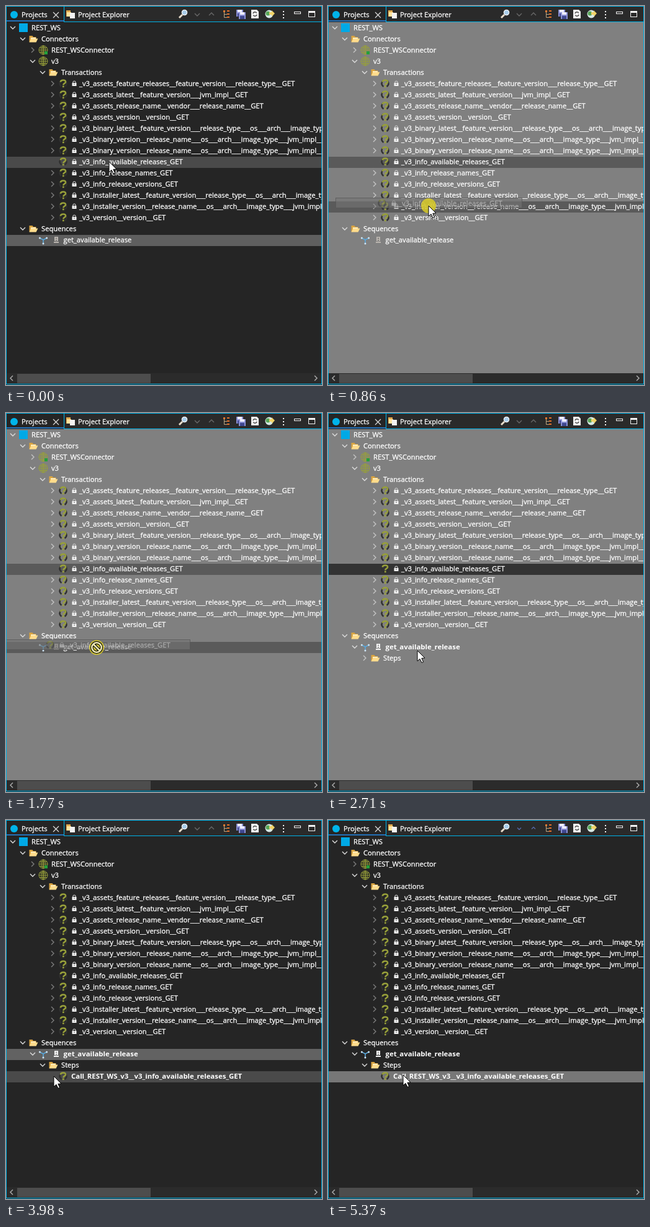
Recreate the animation shown at these times as an HTML page with a canvas. Size 509 by 611 pixels, loop 6870 ms.

```html
<!DOCTYPE html>
<html lang="en">
<head>
<meta charset="utf-8">
<title>Projects tree</title>
<style>
html, body { margin: 0; width: 100%; height: 100%; overflow: hidden; background: #252525; }
canvas { display: block; }
</style>
</head>
<body>
<canvas id="stage" width="509" height="611"></canvas>
<script>
const W = 509, H = 611, LOOP = 6870, STEP = 70;
const BAR = 26, ROW = 18, INDENT = 16, FOOT = 592;
const CYAN = '#00b4ea', OLIVE = '#98a03a', PALE = '#f2f2f2';
const g = document.getElementById('stage').getContext('2d');

// Moments at which the state changes
const PRESS = 270, DRAG = 400, DENY = 1630, DROP = 2040, FADE = 2370, GONE = 2430,
  ADDED = 2630, SETTLED = 2760, UNFOLD = 3780, UNFOLDED = 3850, SELECT = 4780;

// Each move eases the pointer from where it was; the power shapes the vertical slowdown.
const HOME = { x: 166, y: 251 };
const MOVES = [
  { from: 200, to: 510, x: 168, y: 264, power: 1 },
  { from: 510, to: 1770, x: 146, y: 378, power: 2.2 },
  { from: 1770, to: 1900, x: 144, y: 383, power: 1 },
  { from: 2890, to: 3170, x: 75, y: 398, power: 1 },
  { from: 3240, to: 3640, x: 58, y: 393, power: 1 },
  { from: 3850, to: 3980, x: 77, y: 413, power: 1 },
  { from: 3980, to: 4050, x: 78, y: 419, power: 1 },
  { from: 4120, to: 4570, x: 118, y: 410, power: 1 },
  { from: 5300, to: 5370, x: 121, y: 411, power: 1 }
];

const CALLS = [
  'assets_feature_releases__feature_version___release_type__GET',
  'assets_latest__feature_version___jvm_impl__GET',
  'assets_release_name__vendor___release_name__GET',
  'assets_version__version__GET',
  'binary_latest__feature_version___release_type___os___arch___image_type___jvm_impl__GET',
  'binary_version__release_name___os___arch___image_type___jvm_impl__GET',
  'binary_version__release_name___os___arch___image_type___jvm_impl__project__GET',
  'info_available_releases_GET',
  'info_release_names_GET',
  'info_release_versions_GET',
  'installer_latest__feature_version___release_type___os___arch___image_type___jvm_impl__GET',
  'installer_version__release_name___os___arch___image_type___jvm_impl__GET',
  'version__version__GET'
];
const PICKED = '_v3_info_available_releases_GET';
const SEQUENCE = 'get_available_release';
const STEP_CALL = 'Call_REST_WS_v3_' + PICKED;

const rowTop = i => BAR + 1 + ROW * i;
const rowAt = y => Math.floor((y - BAR - 1) / ROW);

function rect(color, x, y, w, h) {
  g.fillStyle = color;
  g.fillRect(x, y, w, h);
}
function box(color, x, y, w, h) {
  g.strokeStyle = color;
  g.lineWidth = 1;
  g.strokeRect(x + .5, y + .5, w - 1, h - 1);
}
function fill(color, d) {
  g.fillStyle = color;
  g.fill(new Path2D(d));
}
function stroke(color, width, d) {
  g.strokeStyle = color;
  g.lineWidth = width;
  g.stroke(new Path2D(d));
}
function disc(color, x, y, r) {
  g.beginPath();
  g.arc(x, y, r, 0, 7);
  g.fillStyle = color;
  g.fill();
}
function ring(color, width, x, y, rx, ry = rx, from = 0, to = Math.PI * 2) {
  g.beginPath();
  g.ellipse(x, y, rx, ry, 0, from, to);
  g.strokeStyle = color;
  g.lineWidth = width;
  g.stroke();
}
function text(s, x, y, bold, color = '#fff') {
  g.font = (bold ? 'bold 11.4px' : '11.2px') + ' "Open Sans", "Noto Sans", sans-serif';
  g.fillStyle = g.strokeStyle = color;
  g.fillText(s, x, y + 4);
  if (bold) return;
  g.lineWidth = .3;
  g.strokeText(s, x, y + 4);
}
function at(x, y, draw) {
  g.save();
  g.translate(x, y);
  draw();
  g.restore();
}
function chevron(x, y, turn, color, size = 4) {
  at(x, y, () => {
    g.rotate(turn);
    stroke(color, 1.4, `M${-size} ${-size / 2}L0 ${size / 2}L${size} ${-size / 2}`);
  });
}

const icons = {
  project() { rect('#00a9e6', -7, -7, 14, 14); },
  folder() {
    fill('#d9a441', 'M-6.5 5V-5H-1.5L0 -3H4.5V5Z');
    rect('#fff3cf', -4, -2, 8, 3);
    fill('#ffdc8c', 'M-6.5 5.5L-3.5 -.5H7.5L4.5 5.5Z');
  },
  globe() {
    for (const rx of [7, 3.2, 0]) ring(OLIVE, 1, 0, 0, rx, 7);
    for (const y of [-3.5, 0, 3.5]) {
      const half = Math.sqrt(49 - y * y);
      rect(OLIVE, -half, y - .5, half * 2, 1);
    }
  },
  connector() {
    icons.globe();
    rect('#24a03a', 2, 2, 5, 5);
  },
  call() {
    for (const side of [0, Math.PI]) ring('#303030', 2.5, 0, 0, 5.5, 5.5, side - 1.1, side + 1.1);
    stroke(OLIVE, 2.6, 'M-4.3 -2.5C-3.5 -6.5 4.6 -6.5 4 -2.3C3.6 -.3 .4 -.5 .3 2.4');
    rect(OLIVE, -1, 3.6, 2.6, 2.6);
  },
  sequence() {
    for (let i = 0; i < 3; i++) {
      const a = Math.PI * (1 / 2 + i * 2 / 3), x = 6.5 * Math.cos(a), y = 6 * Math.sin(a);
      stroke('#5aa9dd', 1.5, `M0 0L${x} ${y}`);
      disc('#cfe6f6', x, y, 1.5);
    }
  }
};

function lock(x, y) {
  ring('#c8c8c8', 1.2, x, y - 1, 2.2, 3, Math.PI, 0);
  rect(PALE, x - 3.5, y - 1, 7, 5);
  rect('#555', x - .5, y, 1, 2);
}
function badge(x, y, color) {
  rect(color, x - 3, y - 5, 6, 7);
  for (const dy of [-3, 0]) rect('#555', x - 1, y + dy, 2, 1);
  rect(color, x - 4, y + 3, 8, 2);
}

const tools = {
  find() {
    stroke('#e8dccb', 3, 'M-1 1L-6 6');
    disc('#a9cdea', 2.5, -2.5, 4);
    ring(PALE, 1.2, 2.5, -2.5, 4.2);
  },
  tree() {
    stroke('#bda680', 1, 'M-3.5 -5V5.5H2M-3.5 .5H2');
    rect('#e27a32', -5, -6, 3, 3);
    for (const y of [-5, 0, 5]) rect('#e0702c', 1, y - 1, 4, 2);
  },
  save() {
    for (const d of [-7, -3]) {
      rect('#8c91d4', d, d, 11, 11);
      rect('#eef', d + 2, d, 7, 4);
      rect('#3f478f', d + 2, d + 6, 7, 5);
    }
  },
  refresh() {
    fill(PALE, 'M-6 -7H3L6 -4V7H-6Z');
    for (const side of [0, Math.PI]) ring('#444', 1.4, 0, 0, 3.2, 3.2, side + .3, side + 2.6);
  },
  world() {
    disc('#d7e8e6', 0, 0, 6.5);
    disc('#57a557', -2, -1, 3.5);
    fill('#f1d368', 'M0 -3H4V-6L9 -1L4 4V1H0Z');
  },
  more() { for (const y of [-5, 0, 5]) rect(PALE, -1, y, 2, 2); },
  shrink() { box(PALE, -6, -4, 11, 4); },
  grow() {
    box(PALE, -6, -5, 11, 10);
    rect(PALE, -6, -4, 11, 2);
  }
};

function header(enabled) {
  rect('#2a2a2a', 0, 0, W, BAR);
  rect('#252525', 1, 1, 92, BAR - 1);
  rect('#2470b8', 1, BAR - 3, 92, 2);
  disc(CYAN, 13, 14, 6);
  text('Projects', 25, 14);
  stroke('#ddd', 1.2, 'M76 10L85 19M85 10L76 19');
  rect('#e0a94d', 97, 7, 7, 10);
  rect('#ffe3a0', 98, 10, 7, 7);
  rect(PALE, 103, 11, 8, 9);
  text('Project Explorer', 116, 14);

  Object.values(tools).forEach((draw, i) => at(i ? 332 + 23 * i : 285, 13, draw));
  const arrow = enabled ? '#5668a8' : '#686868';
  chevron(308, 14, 0, arrow, enabled ? 3 : 4);
  chevron(331, 13, Math.PI, arrow, enabled ? 3 : 4);
}

function footer() {
  rect('#2b2b2b', 1, FOOT, W - 2, 17);
  rect('#4d4d4d', 18, FOOT + 1, 215, 15);
  chevron(9, FOOT + 8, Math.PI / 2, '#b0b0b0');
  chevron(499, FOOT + 8, -Math.PI / 2, '#b0b0b0');
}

function borders() {
  box(CYAN, 0, 0, W, H - 1);
  rect(CYAN, 93, 0, 1, BAR);
  rect(CYAN, 93, BAR - 1, W - 93, 1);
}

function treeRows(s) {
  const add = (level, icon, open, label, bold) => ({ level, icon, open, label, bold });
  return [
    add(0, 'project', true, 'REST_WS'),
    add(1, 'folder', true, 'Connectors'),
    add(2, 'connector', false, 'REST_WSConnector'),
    add(2, 'globe', true, 'v3'),
    add(3, 'folder', true, 'Transactions'),
    ...CALLS.map(name => '_v3_' + name).map(label =>
      add(4, 'call', label === PICKED ? null : false, label)),
    add(1, 'folder', true, 'Sequences'),
    add(2, 'sequence', s.grown || null, SEQUENCE, s.grown),
    ...(s.grown ? [add(3, 'folder', s.steps, 'Steps')] : []),
    ...(s.steps ? [add(4, 'call', null, STEP_CALL, true)] : [])
  ];
}

function drawRow(r, i, grey) {
  const x = 28 + INDENT * r.level, y = rowTop(i) + 8;
  let textX = x + 13;
  if (r.open) chevron(x - 17, y, 0, '#dcdcdc');
  else if (r.open === false) chevron(x - 17, y, -Math.PI / 2, grey ? '#c4c4c4' : '#7c7c7c');
  at(x, y, icons[r.icon]);
  if (r.icon === 'call' && !r.bold) {
    lock(x + 18, y);
    textX = x + 26;
  }
  if (r.icon === 'sequence') {
    badge(x + 21, y, r.bold ? PALE : '#b9b4ae');
    textX = x + 32.5;
  }
  text(r.label, textX, y, r.bold);
}

function highlights(t, s, rows, y) {
  const bar = (i, color) => rect(color, 1, rowTop(i), W - 2, ROW);
  const mark = (label, color) => bar(rows.findIndex(r => r.label === label), color);
  if (s.grey) {
    mark(PICKED, s.grown ? '#333' : '#5a5a5a');
    if (!s.grown) bar(rowAt(y), '#5a5a5a');
    return;
  }
  if (t < SELECT) bar(rowAt(y), '#4a4a4a');
  if (t < PRESS) mark(SEQUENCE, '#5f5f5f');
  else if (t < DRAG) mark(PICKED, '#777');
  else if (t < SELECT) mark(SEQUENCE, '#626262');
  else mark(STEP_CALL, '#777');
}

// The insertion line shows when the pointer is close to a row's edge.
function insertion(y) {
  const edge = Math.round((y - rowTop(0)) / ROW);
  if (Math.abs(y - rowTop(edge)) < 5) rect('#858585', 1, rowTop(edge) - 1, W - 2, 2);
}

function ghost(x, y, alpha) {
  g.save();
  g.globalAlpha = alpha;
  rect('rgba(118,118,118,.6)', x - 150, y - 13, 301, 17);
  box('rgba(70,70,70,.5)', x - 150, y - 13, 301, 17);
  g.globalAlpha = alpha * .45;
  at(x - 75, y - 4, icons.call);
  lock(x - 56, y - 4);
  text(PICKED, x - 48, y - 4, false, '#e4e4e4');
  g.restore();
}

const pointers = {
  arrow() {
    const shape = 'M0 0V17L4 13.4L7 19.5L9.6 18.4L6.8 12.4L12 12Z';
    fill('#fff', shape);
    stroke('#000', 1, shape);
  },
  move() {
    pointers.arrow();
    box('#fff', 4, 15, 9, 8);
    g.setLineDash([1.5, 1.5]);
    box('#000', 4, 15, 9, 8);
  },
  deny() {
    for (const [color, width] of [['#111', 5], ['#f3edb4', 2.6]]) {
      ring(color, width, 0, 0, 7.7);
      stroke(color, width, 'M-5.4 -5.4L5.4 5.4');
    }
  }
};

function pointerAt(t) {
  let { x, y } = HOME;
  for (const m of MOVES) {
    if (t < m.from) break;
    const held = Math.floor((t - m.from) / STEP) * STEP;
    const u = t >= m.to ? 1 : held / (m.to - m.from);
    x += (m.x - x) * u;
    y += (m.y - y) * (1 - (1 - u) ** m.power);
  }
  return [Math.round(x), Math.round(y)];
}

function draw(t) {
  const between = (a, b) => t >= a && t < b;
  const s = { grey: between(DRAG, SETTLED), grown: t >= ADDED, steps: t >= UNFOLDED };
  const [x, y] = pointerAt(t);
  const rows = treeRows(s);

  rect('#252525', 0, 0, W, H);
  header(t >= SELECT);
  footer();
  g.save();
  g.beginPath();
  g.rect(1, BAR, W - 2, FOOT - BAR);
  g.clip();
  if (s.grey) rect('#808080', 1, BAR, W - 2, FOOT - BAR);
  highlights(t, s, rows, y);
  rows.forEach((r, i) => drawRow(r, i, s.grey));
  if (between(DRAG, DROP)) insertion(y);
  if (between(DRAG, GONE)) ghost(x, y, t < FADE ? 1 : .5);
  if (between(PRESS, DROP) || between(UNFOLD, UNFOLD + 140) || between(SELECT, SELECT + 120))
    disc('rgba(222,208,36,.82)', x, y, 12);
  const kind = between(DENY, DROP) ? 'deny' : between(DRAG, ADDED) ? 'move' : 'arrow';
  at(x, y, pointers[kind]);
  g.restore();
  borders();
}

const start = performance.now();
function tick() {
  draw((performance.now() - start) % LOOP);
  requestAnimationFrame(tick);
}
tick();
</script>
</body>
</html>
```
